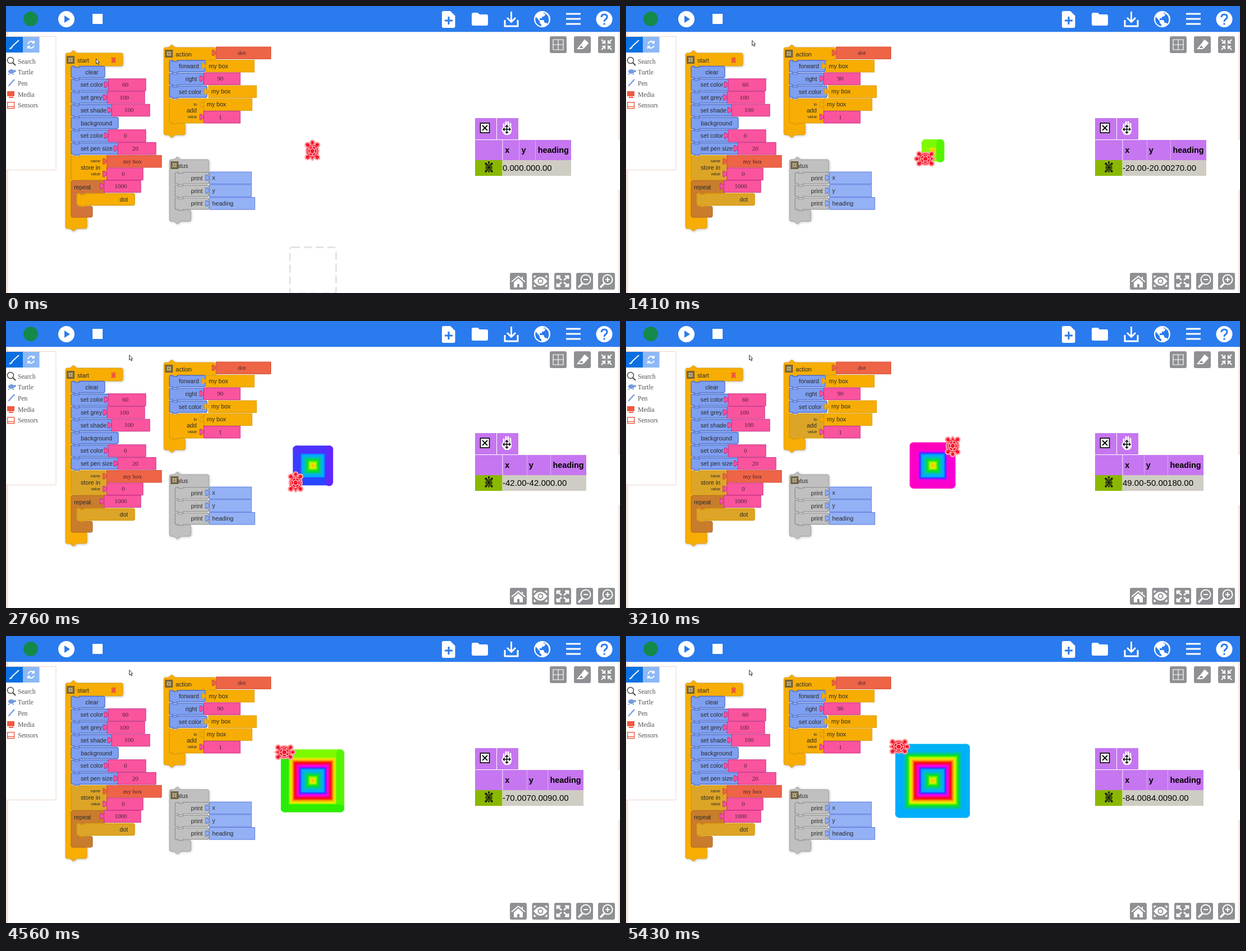
An HTML page with a canvas that plays this animation: 1093 by 512 pixels, repeating every 5.46 s.

```html
<!DOCTYPE html>
<html lang="en">
<head>
<meta charset="utf-8">
<title>Turtle spiral</title>
<style>
html, body { margin: 0; width: 100%; height: 100%; overflow: hidden; background: #fff; }
canvas, svg { position: absolute; left: 0; top: 0; width: 1093px; height: 512px; }
svg text { font-family: "Liberation Sans", Arial, sans-serif; font-size: 10.7px; fill: #2b2b2b; }
svg text.serif { font-family: "Liberation Serif", "Times New Roman", serif; font-size: 11px; fill: #4a2230; }
svg text.small { font-size: 7px; }
svg text.menu { font-size: 11.6px; fill: #555; }
.hat { filter: drop-shadow(1px 1px 2px rgba(0, 0, 0, .24)); }
#table { position: absolute; left: 884px; top: 239px; display: flex; font: 15px "Liberation Sans", Arial, sans-serif; color: #000; }
#table b { display: block; height: 36px; line-height: 36px; padding: 0 4.3px; font-size: 14.4px; background: #c676f0; box-shadow: inset 1px 0 #dcaef6; }
#table span { display: block; height: 28px; line-height: 28px; background: #cfcdc3; white-space: nowrap; }
</style>
</head>
<body>
<canvas id="paper" width="1093" height="512"></canvas>
<svg id="scene" viewBox="0 0 1093 512"></svg>
<div id="table">
  <div><b>x</b><span id="sx">0.00</span></div>
  <div><b>y</b><span id="sy">0.00</span></div>
  <div><b>heading</b><span id="sh">0.00</span></div>
</div>
<script>
const LOOP = 5460, TICK = 30;
const $ = id => document.getElementById(id);

// ---- static scene ----
const skin = {
  blue: ['#7f9ff0', '#4c70cc'], value: ['#94b1f5', '#5574dc'], pink: ['#fa549e', '#c42a84'],
  gold: ['#f7ad03', '#d99a08'], coral: ['#ed6446', '#cf4d33'], brown: ['#d2743a', '#a95a24'],
  grey: ['#bfc0bf', '#939593']
};
const paint = c => `fill="${skin[c][0]}" stroke="${skin[c][1]}"`;
const text = (x, y, s, anchor = 'start', cls = '') =>
  `<text x="${x}" y="${y}" text-anchor="${anchor}" class="${cls}">${s}</text>`;
const rect = (x, y, w, h, fill, more = '') =>
  `<rect x="${x}" y="${y}" width="${w}" height="${h}" fill="${fill}" ${more}/>`;
const line = (d, color, width = 2, more = '') =>
  `<path d="${d}" fill="none" stroke="${color}" stroke-width="${width}" ${more}/>`;
const shape = (d, fill) => `<path d="${d}" fill="${fill}"/>`;

// C-shaped block; a cusp makes it the start of a stack
function clamp(x, y, w, foot, bottom, color, cusp = 5, id = '') {
  return `<path id="${id}" class="${cusp ? 'hat' : ''}" ${paint(color)} stroke-width=".8" d="M${x + 3} ${y}h5l6 ${-cusp}l6 ${cusp}
    H${x + w - 3}q3 0 3 3V${y + 20}q0 3 -3 3H${x + 25}v2h-8v-2H${x + 13}q-3 0 -3 3V${foot - 3}q0 3 3 3
    H${x + 35}q3 0 3 3V${bottom - 3}q0 3 -3 3H${x + 20}l-6 ${cusp}l-6 ${-cusp}H${x + 3}q-3 0 -3 -3V${y + 3}q0 -3 3 -3z"/>`;
}
function block(x, y, right, h, color, label, labelX, id = '') {
  return `<path id="${id}" ${paint(color)} stroke-width="1.3" d="M${x + 3} ${y}h3v2h8v-2H${right - 3}q3 0 3 3V${y + h - 3}
    q0 3 -3 3H${x + 14}v2h-8v-2h-3q-3 0 -3 -3V${y + 3}q0 -3 3 -3z"/>` +
    (label ? text(labelX, y + 14, label, 'end') : '');
}
function arg(x, y, right, color, label, mode = 'serif', h = 21.5) {
  const tab = `<path ${paint(color)} d="M${x} ${y + 8}h-3.5v-2.5h-3.5v10h3.5v-2.5h3.5z"/>`;
  const body = rect(x, y, right - x, h, skin[color][0], `stroke="${skin[color][1]}" stroke-width=".9"`);
  return tab + body + (mode === 'serif' ? text((x + right) / 2 - 3, y + 14, label, 'middle', 'serif') : text(x + 5, y + 14, label));
}
const collapse = (x, y) => rect(x, y, 14, 14, '#6b5b38', 'opacity=".9"') +
  line(`M${x + 3} ${y + 3}l3 3v-3m0 3h-3M${x + 11} ${y + 3}l-3 3v-3m0 3h3M${x + 3} ${y + 11}l3 -3v3m0 -3h-3M${x + 11} ${y + 11}l-3 -3v3m0 -3h3`, '#ddd3b5', 1);

function turtle(fill, ink, halo = 'none') {
  const limbs = [[-8.5, -10], [8.5, -10], [-8.5, 12], [8.5, 12]].map(([x, y]) => `<circle cx="${x}" cy="${y}" r="3"/>`).join('');
  const body = `${limbs}<ellipse cy="-14" rx="2.6" ry="3"/><path d="M-2 12L0 16L2 12z"/><ellipse cy="1" rx="10" ry="11"/>`;
  return `<g fill="${halo}" stroke="${halo}" stroke-width="5" stroke-linejoin="round">${body}</g><g fill="${fill}">${body}</g>` +
    `<ellipse cy="1" rx="8" ry="9" fill="none" stroke="${ink}" stroke-width="1.3"/>` +
    line('M0 -4L4 -1.5V3.5L0 6L-4 3.5V-1.5zM0 -4V-8M4 -1.5L7 -4M4 3.5L7 6M0 6V10M-4 3.5L-7 6M-4 -1.5L-7 -4', ink, 1.3);
}

function toolbar() {
  const w = '#fff', b = '#2a7bee';
  return rect(0, 46, 1093, 1, '#dbe4f2') + rect(0, 0, 1093, 46, b) +
    '<circle cx="44" cy="23" r="13" fill="#138a4a"/>' +
    `<circle cx="107.5" cy="23.5" r="14.5" fill="${w}"/>` + shape('M104 17L114 23.5L104 30z', b) +
    rect(154, 14, 18, 18, w) +
    shape('M779 9H791L799.5 17.5V36Q799.5 39 796.5 39H779Q776 39 776 36V12Q776 9 779 9z', w) + line('M788 19V33M781 26H795', b, 3) +
    shape('M832 12H840L843 15H855Q858 15 858 18V32Q858 35 855 35H832Q829 35 829 32V15Q829 12 832 12z', w) +
    line('M888 25V36H911V25', w, 3) + line('M899.5 10V27M892 21L899.5 28.5L907 21', w, 3) +
    `<circle cx="954.5" cy="23.5" r="14.5" fill="${w}"/>` +
    shape('M943 19L950 27V30L953 33V36Q943 34 942 24zM955 12H960V16L957 19H954V22H950V25H957L959 30H962L964 32Q968 26 965 18L961 14z', b) +
    line('M997 14H1023M997 23H1023M997 32H1023', w, 3) +
    `<circle cx="1065" cy="23.5" r="14.5" fill="${w}"/>` +
    line('M1060 20Q1060 15 1065 15Q1070 15 1070 19.5Q1070 22 1067 24Q1065 25.5 1065 28', b, 3) + rect(1063.5, 30.5, 3, 3, b);
}

function sidebar() {
  const edge = '#f8e4db', red = '#ef5a41', names = ['Search', 'Turtle', 'Pen', 'Media', 'Sensors'];
  return rect(0, 47, 4, 465, edge) + rect(1090, 47, 3, 192, edge) + rect(1090, 328, 3, 184, edge) +
    rect(0, 54.5, 89, 238, '#fff', 'stroke="#f0d5ca"') +
    rect(0, 55, 30, 28, '#0a70e2') + rect(30, 55, 29.5, 28, '#8cb8f6') +
    line('M11 72L23 61', '#fff', 1.8) + line('M6 76Q10 76 11 72', '#fff', 2.4) +
    line('M39 68Q41 63 45 63Q48 63 50 66M50 62V66H46M50 71Q48 75 44 75Q41 75 39 72M39 76V72H43', '#fff', 1.8) +
    '<circle cx="8" cy="97" r="5.5" fill="none" stroke="#444" stroke-width="1.4"/>' + line('M12 101L17 106', '#444', 2) +
    '<ellipse cx="9.5" cy="117" rx="5.5" ry="4" fill="#739be0"/><circle cx="16" cy="116" r="2" fill="#739be0"/>' +
    line('M5 121V123M13 121V123', '#739be0', 2) +
    line('M5 142L15 131', '#7c9de8', 2.5) + line('M3 143L6 142', '#7c9de8', 1) +
    rect(2, 152, 13, 9, red) + line('M5 163H13', red, 2) +
    rect(2.7, 171.7, 12, 11, '#fff', `stroke="${red}" stroke-width="1.4"`) + line('M3 179.5H14', red, 1.4) +
    names.map((s, i) => text(21, 102.5 + i * 19.7, s, 'start', 'serif menu')).join('');
}

function startStack() {
  const row = i => 107.5 + i * 22.75;
  const numbers = [[1, 'set color', 182, '60', 249], [2, 'set grey', 180, '100', 247], [3, 'set shade', 188, '100', 256],
    [5, 'set color', 182, '0', 249], [6, 'set pen size', 199, '20', 267]];
  return clamp(106, 84, 102, 376, 397, 'gold') + collapse(108, 89) + text(127, 101, 'start') +
    `<g transform="translate(191.5 96.5) scale(.33)">${turtle('#e8203a', '#ffc070')}</g>` +
    block(116, row(0), 176, 20.5, 'blue', 'clear', 164.5) +
    block(116, row(4), 200, 20.5, 'blue', 'background', 189) +
    numbers.map(([i, label, x, n, r]) => block(116, row(i), x + 1, 20.5, 'blue', label, x - 9) + arg(x, row(i) - .5, r, 'pink', n)).join('') +
    block(116, 266.8, 181, 43.5, 'gold', '', 0, 'store') +
    text(168, 279, 'name', 'end', 'small') + text(168, 292, 'store in', 'end') + text(168, 302, 'value', 'end', 'small') +
    arg(179.5, 266.5, 277, 'coral', 'my box') + arg(179.5, 289, 244, 'pink', '0') +
    clamp(116, 311.5, 60, 357, 377, 'brown', 0, 'repeat') + text(121, 327, 'repeat') + arg(174.5, 311, 240, 'pink', '1000') +
    block(126, 334.5, 229, 21, 'gold', 'dot', 217, 'dot');
}

function actionStack() {
  return clamp(281, 74, 92, 209, 230, 'gold') + collapse(283, 78) + text(302, 90, 'action') + arg(374, 73, 471.5, 'coral', 'dot') +
    block(291, 97, 355, 20.5, 'blue', 'forward', 343.5) + arg(356, 96.5, 442, 'gold', 'my box', 'sans') +
    block(291, 119.8, 352, 20.5, 'blue', 'right', 340) + arg(352, 119, 417, 'pink', '90') +
    block(291, 142.5, 358, 20.5, 'blue', 'set color', 348) + arg(360.5, 142, 446, 'gold', 'my box', 'sans') +
    block(291, 165.3, 352, 43.5, 'gold', '', 0, 'add') +
    text(340, 178, 'to', 'end', 'small') + text(339.5, 190, 'add', 'end') + text(340, 200, 'value', 'end', 'small') +
    arg(352.5, 165, 438, 'gold', 'my box', 'sans') + arg(352, 187.5, 417, 'pink', '1');
}

function statusStack() {
  return clamp(291, 274, 70, 364, 384, 'grey') + text(324, 289, 'status', 'end') + collapse(293, 277) +
    ['x', 'y', 'heading'].map((s, i) => block(301, 296.7 + i * 22.8, 361, 20.5, 'grey', 'print', 350) +
      arg(362, 296 + i * 22.8, i < 2 ? 437 : 443, 'value', s, 'sans')).join('');
}

function buttons() {
  const box = (x, y, d) => rect(x, y, 30, 30, '#8f9093', 'rx="3"') +
    `<g transform="translate(${x + 15} ${y + 15})" fill="none" stroke="#fff" stroke-width="2">${d}</g>`;
  const lens = sign => `<circle cx="2" cy="-3" r="8.5"/><path d="M-4 4L-11 11" stroke-width="3.5"/><path d="${sign}"/>`;
  return box(968, 54, '<path stroke-width="1.2" d="M-9 -9H9V9H-9zM0 -9V9M-9 0H9"/>') +
    box(1011, 54, '<path fill="#fff" d="M-2 0L4 -8L10 -3L3 5z"/><path d="M-2 0L-8 7H0L3 5"/>') +
    box(1054, 54, '<path d="M-9 -9L-3 -3V-8M-3 -3H-8M9 -9L3 -3V-8M3 -3H8M-9 9L-3 3V8M-3 3H-8M9 9L3 3V8M3 3H8"/>') +
    box(897, 476, '<path d="M-12 1L0 -9L12 1M7 -8V-4"/><path fill="#fff" stroke="none" d="M-8 2L0 -5L8 2V11H2V5H-2V11H-8z"/>') +
    box(936.5, 476, '<path fill="#fff" d="M-11 0Q0 -14 11 0Q0 14 -11 0z"/><circle r="4" stroke="#8f9093"/><path d="M-11 -6V-9H-8M11 -6V-9H8M-11 6V9H-8M11 6V9H8"/>') +
    box(976, 476, '<path stroke-width="2.8" d="M-10 -4V-9H-4M4 -9H10V-4M10 4V9H4M-4 9H-10V4M-8 -7L-2 -2M8 -7L2 -2M-8 7L-2 2M8 7L2 2"/>') +
    box(1015, 476, lens('M-2 -3H6')) + box(1054, 476, lens('M-2 -3H6M2 -7V1'));
}

function tableFrame() {
  const p = '#c676f0';
  return rect(835, 200, 38, 38, p) + rect(874, 200, 38, 38, p) + rect(835, 239, 48.5, 36, p) + rect(835, 275, 48.5, 28, '#8ab800') +
    rect(844.5, 209, 16, 17, '#fff', 'stroke="#000" stroke-width="1.6"') + line('M848 213L857 222M857 213L848 222', '#000', 1.8) +
    line('M886 220V211M890 218V207M894 218V207M898 220V210', '#fff', 2.8, 'stroke-linecap="round"') +
    shape('M884 217H900V223Q899 229 894 230H889Q885 228 882 221z', '#fff') +
    line('M891.5 213V227M885 220H898M889 215.5L891.5 213L894 215.5M889 224.5L891.5 227L894 224.5M887.5 217.5L885 220L887.5 222.5M895.5 217.5L898 220L895.5 222.5', '#000', 1.4) +
    `<g transform="translate(859.5 287.5) scale(.62)">${turtle('#111', '#8ab800')}</g>`;
}

$('scene').innerHTML = sidebar() + toolbar() + buttons() + tableFrame() +
  rect(505.5, 430.5, 82, 82, 'none', 'id="trash" rx="4" stroke="#e4e4e4" stroke-width="3" stroke-dasharray="14 7"') +
  startStack() + actionStack() + statusStack() +
  `<g id="turtle">${turtle('#f5142d', '#ffc4c4', '#ffa0a0')}</g>` +
  '<path id="cursor" d="M0 0V9L2 7.2L3.6 10.5L5 9.8L3.5 6.6H6z" fill="#fff" stroke="#222" stroke-width=".9"/>';

// ---- motion ----
function track(keys, t) {
  const i = keys.findIndex(k => k[0] > t);
  if (i === 0) return keys[0].slice(1);
  if (i < 0) return keys[keys.length - 1].slice(1);
  const a = keys[i - 1], b = keys[i], f = (t - a[0]) / (b[0] - a[0]);
  return a.slice(1).map((v, j) => v + (b[j + 1] - v) * f);
}
const pace = [[150, -.99], [192, 0], [1410, 39.3], [2310, 68.7], [3210, 98.3], [3780, 114.95], [4560, 140.95], [5430, 168.95]];
const mouse = [[150, 160.5, 94], [690, 226, 61.5], [1410, 224.5, 61.5], [2310, 221.5, 61.5], [2610, 219.5, 60.7]];
const hues = [[0, 255, 0, 80], [6, 250, 5, 30], [12, 250, 70, 10], [13, 254, 84, 10], [19, 255, 180, 0], [27, 238, 235, 0],
  [36, 125, 250, 0], [38, 45, 238, 0], [48, 0, 212, 85], [56, 0, 195, 170], [62, 0, 180, 235], [67, 0, 173, 255], [74, 0, 160, 255],
  [78, 40, 70, 255], [83, 130, 20, 255], [88, 235, 0, 245], [96, 255, 0, 190], [100, 255, 0, 80]];

// corner of the square spiral reached after n steps
function corner(n) {
  if (n < 1) return [0, 0];
  const k = 2 * Math.floor(n / 4);
  return [[-k, k], [k + 1, k], [k + 1, -k - 2], [-k - 2, -k - 2]][n % 4];
}
const heading = n => (n + 1) * 90 % 360;
const SCALE = .71, toStage = ([x, y]) => [546.1 + x * SCALE, 257.7 - y * SCALE];

const pen = $('paper').getContext('2d');
pen.lineCap = 'round';
pen.lineWidth = 20 * SCALE;
let drawn = -1;
function drawSpiral(n) {
  if (n === drawn) return;
  drawn = n;
  pen.clearRect(0, 0, 1093, 512);
  for (let i = 1; i <= n; i++) {
    pen.strokeStyle = `rgb(${track(hues, (i - 1) % 100).map(Math.round)})`;
    pen.beginPath();
    pen.moveTo(...toStage(corner(i - 1)));
    pen.lineTo(...toStage(corner(i)));
    pen.stroke();
  }
}

const tint = (id, on, lit, dim) => $(id).setAttribute('fill', on ? dim : lit);
function show(now) {
  const t = Math.floor(now % LOOP / TICK) * TICK;
  const u = track(pace, t)[0];
  const since = lag => Math.max(-1, Math.floor(u - lag));
  const step = since(0), turned = since(.5);
  // the sprite follows late on even steps
  const late = step % 2 ? 0 : .9;
  const at = since(late), facing = heading(since(Math.max(late, .5)));

  drawSpiral(since(.9));
  const [px, py] = toStage(corner(at));
  $('turtle').setAttribute('transform', `translate(${px} ${py}) rotate(${facing}) translate(-.7 0)`);
  const [x, y] = corner(step);
  $('sx').textContent = x.toFixed(2);
  $('sy').textContent = y.toFixed(2);
  $('sh').textContent = heading(turned).toFixed(2);

  const [mx, my] = track(mouse, t);
  $('cursor').setAttribute('transform', `translate(${mx} ${my})`);
  $('trash').style.opacity = Math.max(0, Math.min(1, (660 - t) / 510));
  const running = t > 150;
  for (const id of ['store', 'dot']) tint(id, running, skin.gold[0], '#dda527');
  tint('repeat', running, skin.brown[0], '#c97d2c');
  tint('add', step % 13 === 6 || (step - 1) % 13 === 6, skin.gold[0], '#dda527');
}
const begin = performance.now();
function loop() {
  show(performance.now() - begin);
  requestAnimationFrame(loop);
}
loop();
</script>
</body>
</html>
```
